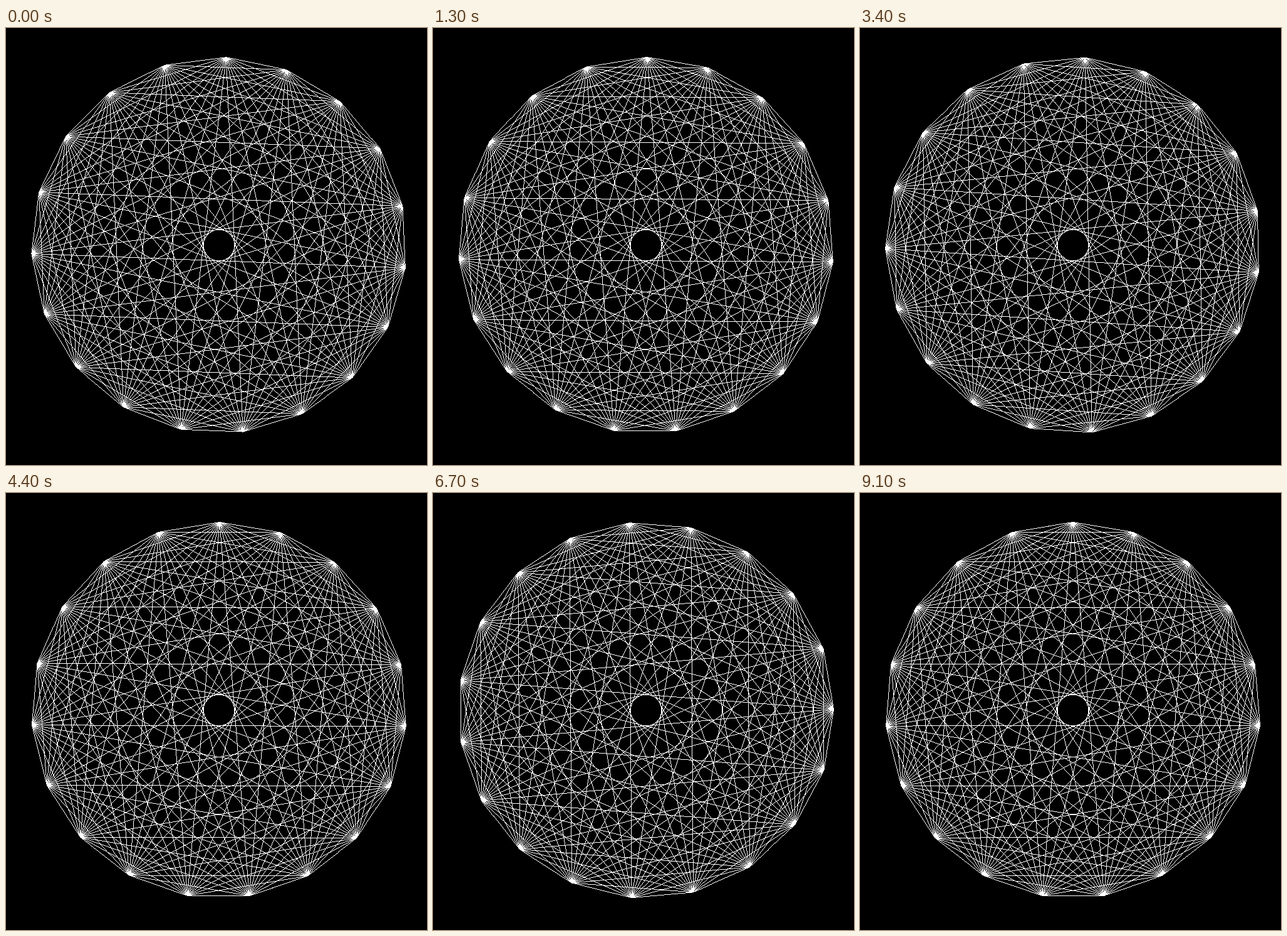
These frames come from a looping animation (672x696 px, 9.2 s). An HTML page with a canvas:

```html
<!DOCTYPE html>
<html lang="en">
<head>
<meta charset="utf-8">
<title>Rotating complete graph</title>
<style>
  html, body { margin: 0; width: 100%; height: 100%; overflow: hidden; background: #000; }
  canvas { display: block; }
</style>
</head>
<body>
<canvas id="stage" width="672" height="696"></canvas>
<script>
const W = 672, H = 696;
const CX = 340, CY = 346, R = 299.5, POINTS = 19;
const LOOP = 9200, STEPS = 65, STEP_MS = 143;
const START_DEG = 2.17, STEP_DEG = 10.327;

const ctx = document.getElementById('stage').getContext('2d');
const image = ctx.createImageData(W, H);
const pixels = new Uint32Array(image.data.buffer);
const BLACK = 0xff000000, WHITE = 0xffffffff;

// Steps begin on a 100 ms grid; the last one is held to the loop's end.
const startOf = k => Math.min(LOOP - 100, Math.round(k * STEP_MS / 100) * 100);

function stepAt(t) {
  let k = STEPS - 1;
  while (k > 0 && startOf(k) > t) k--;
  return k;
}

// Hard-edged line, one pixel wide.
function line(a, b) {
  const dx = b.x - a.x, dy = b.y - a.y;
  const n = Math.ceil(Math.max(Math.abs(dx), Math.abs(dy)));
  for (let i = 0; i <= n; i++) {
    const x = Math.floor(a.x + dx * i / n);
    const y = Math.floor(a.y + dy * i / n);
    pixels[y * W + x] = WHITE;
  }
}

function draw(step) {
  const turn = (START_DEG + step * STEP_DEG) * Math.PI / 180;
  const points = Array.from({ length: POINTS }, (_, i) => {
    const angle = turn + i * 2 * Math.PI / POINTS;
    return { x: CX + R * Math.sin(angle), y: CY - R * Math.cos(angle) };
  });
  pixels.fill(BLACK);
  for (let i = 0; i < POINTS; i++) {
    for (let j = i + 1; j < POINTS; j++) line(points[i], points[j]);
  }
  ctx.putImageData(image, 0, 0);
}

let shown = -1;
function tick() {
  const step = stepAt(performance.now() % LOOP);
  if (step !== shown) draw(shown = step);
  requestAnimationFrame(tick);
}
tick();
</script>
</body>
</html>
```
